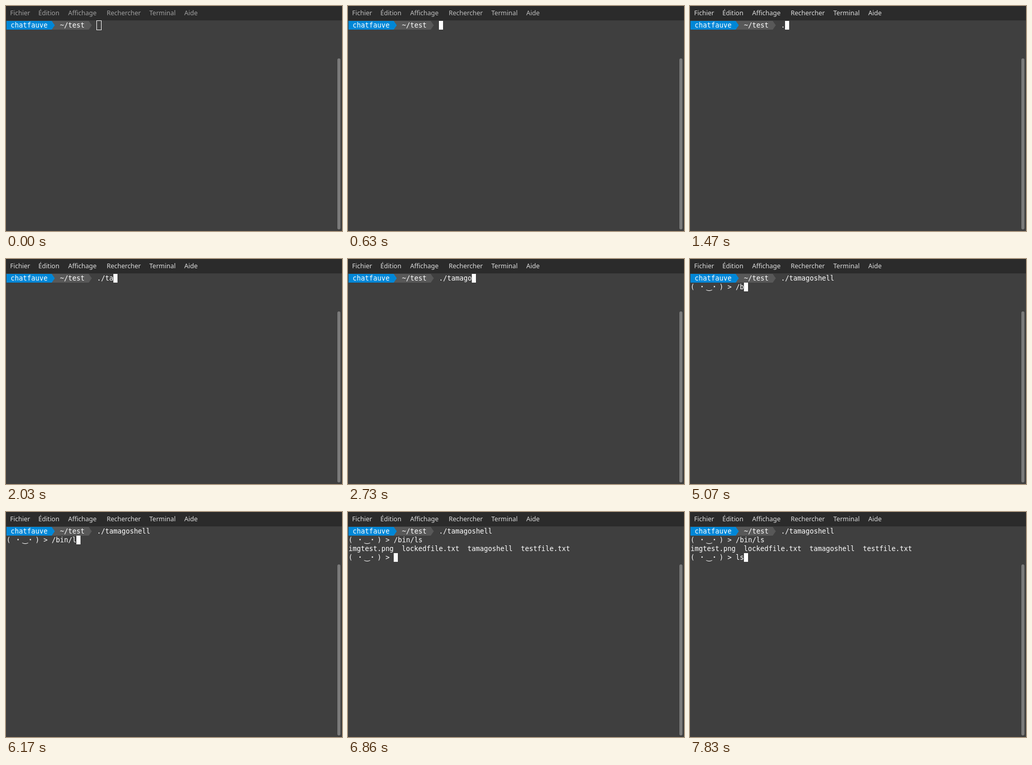
An HTML page for the animation above (8000 ms loop, 654 by 438 pixels).

```html
<!DOCTYPE html>
<html lang="fr">
<head>
<meta charset="utf-8">
<title>Terminal</title>
<style>
html, body { margin: 0; width: 100%; height: 100%; overflow: hidden; background: #3f3f3f; }
#stage { position: relative; width: 654px; height: 438px; overflow: hidden; background: #3f3f3f; }
#stage * { position: absolute; top: 0; white-space: pre; }
#menu { left: 0; width: 654px; height: 28px; background: #2b2b2b;
  font: 12.5px/28px "Noto Sans", sans-serif; }
#stage #screen { left: 1px; top: 29px; color: #fff;
  font: 13.288px/17px "DejaVu Sans Mono", monospace; }
.seg { height: 17px; }
.user { left: 0; width: 94px; background: #0087d7;
  clip-path: polygon(0 0, 88px 0, 100% 50%, 88px 100%, 0 100%); }
.path { left: 88px; width: 78px; background: #585858;
  clip-path: polygon(0 0, 72px 0, 100% 50%, 72px 100%, 0 100%); }
.face { left: 0; }
.dot { font-weight: bold; }
.smile { font-family: "DejaVu Sans", sans-serif; left: 31px; }
#cursor { width: 8px; height: 17px; background: #fff; box-sizing: border-box; }
#cursor.hollow { width: 10px; height: 19px; margin: -1px; background: none; border: 1px solid #fff; }
#stage #bar { left: 645px; top: 102px; width: 6px; height: 333px; border-radius: 3px; background: #7a7a7a; }
</style>
</head>
<body>
<div id="stage">
  <div id="menu">
    <span style="left:8px">Fichier</span>
    <span style="left:63px">Édition</span>
    <span style="left:121px">Affichage</span>
    <span style="left:196px">Rechercher</span>
    <span style="left:279px">Terminal</span>
    <span style="left:347px">Aide</span>
  </div>
  <div id="screen">
    <div class="seg path">  ~/test</div>
    <div class="seg user"> chatfauve</div>
    <div id="cursor"></div>
  </div>
  <div id="bar"></div>
</div>
<script>
const LOOP = 8000, CELL = 8, ROW = 17;
const FOCUS = 430, FADE = 400, FADE_STEPS = 10;
const BLINK_OFF = 7440, BLINK_ON = 7670;

// Each command: row, first column, time the prompt appears, key times
const commands = [
  { row: 0, col: 22, start: 0, text: "./tamagoshell",
    keys: [1470, 1690, 1920, 2030, 2240, 2320, 2560, 2730, 2860, 2990, 3160, 3330, 3590] },
  { row: 1, col: 11, start: 4070, text: "/bin/ls",
    keys: [4680, 5070, 5300, 5480, 5910, 6170, 6420] },
  { row: 3, col: 11, start: 6860, text: "ls", keys: [7720, 7830] }
];

const menu = document.getElementById("menu");
const screenBox = document.getElementById("screen");
const cursor = document.getElementById("cursor");

function addLine(row, col, html = "") {
  const line = document.createElement("div");
  line.style.left = col * CELL + "px";
  line.style.top = row * ROW + "px";
  line.innerHTML = html;
  screenBox.insertBefore(line, cursor);
  return line;
}

const face = `<span class="face">(      ) &gt;</span>
<span class="dot" style="left:18.5px">·</span>
<span class="smile">‿</span>
<span class="dot" style="left:42.5px">·</span>`;

for (const c of commands) {
  c.line = addLine(c.row, c.col);
  if (c.row) c.prompt = addLine(c.row, 0, face);
}
const listing = addLine(2, 0, "imgtest.png  lockedfile.txt  tamagoshell  testfile.txt");

const show = (el, on) => { el.style.visibility = on ? "visible" : "hidden"; };

function draw(t) {
  const step = t < FOCUS ? 0 : Math.floor((t - FOCUS) / FADE * (FADE_STEPS - 1)) + 1;
  const grey = Math.round(160 + 62 * Math.min(1, step / FADE_STEPS));
  menu.style.color = `rgb(${grey},${grey},${grey})`;

  let active, typed;
  for (const c of commands) {
    const n = c.keys.filter(k => k <= t).length;
    c.line.textContent = c.text.slice(0, n);
    if (c.prompt) show(c.prompt, t >= c.start);
    if (t >= c.start) { active = c; typed = n; }
  }
  show(listing, t >= commands[2].start);

  cursor.style.left = (active.col + typed) * CELL + "px";
  cursor.style.top = active.row * ROW + "px";
  cursor.className = t < FOCUS ? "hollow" : "";
  show(cursor, t < BLINK_OFF || t >= BLINK_ON);
}

const origin = performance.now();
function tick() {
  draw((performance.now() - origin) % LOOP);
  requestAnimationFrame(tick);
}
tick();
</script>
</body>
</html>
```
